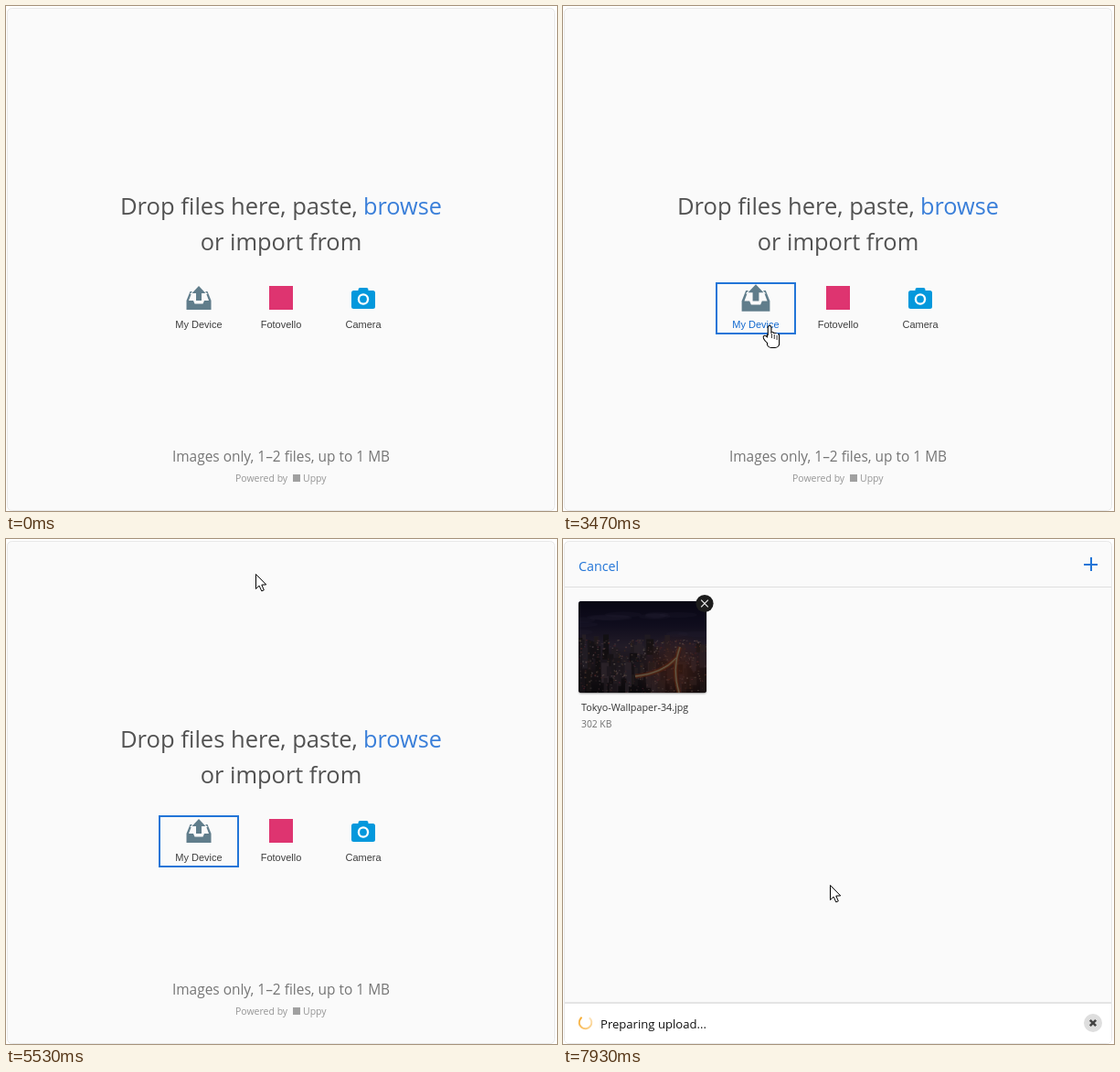
An HTML page with a canvas for the animation above (8000 ms loop, 603 by 552 pixels).

```html
<!DOCTYPE html>
<html lang="en">
<head>
<meta charset="utf-8">
<title>File uploader</title>
<style>
html, body { margin: 0; width: 100%; height: 100%; overflow: hidden; background: #fff; }
canvas { display: block; width: 603px; height: 552px; }
</style>
</head>
<body>
<canvas id="stage"></canvas>
<script>
const W = 603, H = 552, LOOP = 8000, FPS = 15;
const BLUE = '#2275d7', WIN = '#0078d7', BG = '#fafafa', RULE = '#dfdfdf';
const TITLE = '#525252', LABEL = '#3e3e3e';
const SANS = '"Open Sans", "Noto Sans", sans-serif';
const ARIAL = '"Liberation Sans", Arial, sans-serif';

// Moments, in steps of 1/15 s
const FOCUS = 33, OPEN = 52, THUMBS = 66, SELECT = 77, CLOSE = 78;
const LIST = 86, PREVIEW = 88, UPLOAD = 110;

const canvas = document.getElementById('stage');
const dpr = window.devicePixelRatio || 1;
canvas.width = W * dpr;
canvas.height = H * dpr;
const c = canvas.getContext('2d');

// Pointer moves: first step, last step, target x, target y
const moves = [
  [6, 9, 572, 483], [15, 28, 227, 349], [57, 64, 158, 296], [66, 73, 273, 38],
  [87, 91, 257, 100], [91, 93, 204, 276], [96, 104, 86, 515], [112, 119, 292, 378]
];

const ramp = (f, a, b) => Math.max(0, Math.min(1, (f - a) / (b - a)));
const easeOut = (k, power) => 1 - (1 - k) ** power;
const inside = (p, x, y, w, h) => p.x >= x && p.x < x + w && p.y >= y && p.y < y + h;

// Vertical travel settles sooner than horizontal, which bends the path
function pointerAt(f) {
  const p = { x: W, y: H };
  for (const [from, to, x, y] of moves) {
    const k = ramp(f, from, to);
    p.x += (x - p.x) * easeOut(k, 2);
    p.y += (y - p.y) * easeOut(k, 3);
  }
  return { x: Math.round(p.x), y: Math.round(p.y) };
}

function text(s, x, y, size, color, align = 'left', family = SANS) {
  c.font = `${size}px ${family}`;
  c.textAlign = align;
  c.fillStyle = color;
  c.fillText(s, x, y);
}

function rect(x, y, w, h, color) {
  c.fillStyle = color;
  c.fillRect(x, y, w, h);
}

function box(x, y, w, h, fill, border, lw = 1) {
  rect(x, y, w, h, border);
  rect(x + lw, y + lw, w - 2 * lw, h - 2 * lw, fill);
}

function round(x, y, w, h, r, color) {
  c.beginPath();
  c.roundRect(x, y, w, h, r);
  c.fillStyle = color;
  c.fill();
}

function disc(x, y, r, color, ry = r) {
  c.beginPath();
  c.ellipse(x, y, r, ry, 0, 0, Math.PI * 2);
  c.fillStyle = color;
  c.fill();
}

function trace(points) {
  c.beginPath();
  for (let i = 0; i < points.length; i += 2) c.lineTo(points[i], points[i + 1]);
}

function poly(color, points) {
  trace(points);
  c.closePath();
  c.fillStyle = color;
  c.fill();
}

function line(color, lw, ...points) {
  trace(points);
  c.strokeStyle = color;
  c.lineWidth = lw;
  c.stroke();
}

// Closes the right half of an outline with its left mirror image
function mirror(...half) {
  const all = [...half];
  for (let i = half.length - 2; i >= 0; i -= 2) all.push(-half[i], half[i + 1]);
  return all;
}

function cross(x, y, r, lw, color) {
  for (const s of [-1, 1]) line(color, lw, x - r, y - r * s, x + r, y + r * s);
}

function fade(x0, y0, x1, y1, ...colors) {
  const g = c.createLinearGradient(x0, y0, x1, y1);
  colors.forEach((color, i) => g.addColorStop(i / (colors.length - 1), color));
  return g;
}

function clipTo(x, y, w, h, r = 0) {
  c.save();
  c.beginPath();
  c.roundRect(x, y, w, h, r);
  c.clip();
}

function shadow(blur, dx, dy, color) {
  c.shadowBlur = blur * dpr;
  c.shadowOffsetX = dx * dpr;
  c.shadowOffsetY = dy * dpr;
  c.shadowColor = color;
}

function panel() {
  rect(0, 0, W, H, '#fff');
  round(1.5, 2.5, 599, 549, 5, BG);
  c.strokeStyle = '#e8e8e8';
  c.lineWidth = 1;
  c.stroke();
}

function trayIcon(scale) {
  const color = '#607d8b', arrow = mirror(0, -13, 7.5, -5, 3, -5, 3, 3);
  c.save();
  c.translate(211, 319);
  c.scale(scale, scale);
  poly(color, mirror(9.5, -7, 13.5, 3, 13.5, 13));
  poly(BG, mirror(8, -5, 11, 3, 6, 3, 4.5, 6.5));
  poly(color, arrow);
  c.strokeStyle = BG;
  c.lineWidth = 2;
  c.stroke();
  poly(color, arrow);
  c.restore();
}

function cameraIcon() {
  const color = '#0398dc';
  round(378, 311, 26, 20, 2.5, color);
  round(385.5, 308, 11, 6, 2, color);
  disc(391, 320.5, 6.2, '#fff');
  disc(391, 320.5, 3.9, color);
}

function startView(hover, focus) {
  text('Drop files here, paste,', 125, 228, 25.55, TITLE);
  text('browse', 477, 228, 25.3, '#3a7fd9', 'right');
  text('or import from', 301, 267, 25.4, TITLE, 'center');
  trayIcon(hover ? 1.14 : 1);
  rect(288, 306, 26, 26, '#de3470');
  cameraIcon();
  ['My Device', 'Fotovello', 'Camera'].forEach((name, i) =>
    text(name, 211 + 90 * i, 352, 11, hover && !i ? '#1269cf' : LABEL, 'center', ARIAL));
  if (focus) {
    c.strokeStyle = BLUE;
    c.lineWidth = 2;
    c.strokeRect(168, 303, 86, 55);
  }
  text('Images only, 1–2 files, up to 1 MB', 301, 498, 15.45, '#757575', 'center');
  text('Powered by', 251, 520, 10.5, '#959595');
  rect(314, 512, 8, 8, '#a0a0a0');
  text('Uppy', 325, 520, 10.5, '#959595');
}

// City at night on a 140 x 100 field: sky, rows of towers, lights, a lit road
function cityPhoto(x, y, w, h, r) {
  let seed = 34;
  const rnd = (a, b) => a + (b - a) * ((seed = seed * 16807 % 2147483647) / 2147483647);
  clipTo(x, y, w, h, r);
  c.translate(x, y);
  c.scale(w / 140, h / 100);
  rect(0, 0, 140, 100, fade(0, 0, 0, 100, '#151233', '#28214c', '#5b4a68', '#3b2d38', '#1d171f'));
  for (let i = 0; i < 12; i++) {
    disc(rnd(0, 140), rnd(14, 38), rnd(10, 26), 'rgba(95,85,135,.2)', 3);
  }
  for (let i = 0; i < 90; i++) {
    const top = 36 + i * 0.6 + rnd(-3, 5);
    const shade = rnd(16, 38);
    rect(rnd(-5, 138), top, rnd(3, 9), rnd(9, 24), `hsl(${rnd(280, 350)} 11% ${shade}%)`);
  }
  for (let i = 0; i < 420; i++) {
    const ly = 42 + 58 * rnd(0, 1) ** 1.4;
    rect(rnd(0, 140), ly, rnd(0.8, 2.2), rnd(0.6, 1.6),
      `hsl(${rnd(-20, 35)} 45% ${rnd(45, 92)}% / ${rnd(0.35, 0.9)})`);
  }
  const glow = c.createRadialGradient(107, 76, 2, 107, 76, 42);
  glow.addColorStop(0, 'rgba(225,90,50,.5)');
  glow.addColorStop(1, 'rgba(225,90,50,0)');
  rect(0, 36, 140, 64, glow);
  for (const [lw, color] of [[5, 'rgba(225,85,40,.55)'], [2.4, '#ee9a5c'], [1, '#ffe6c0']]) {
    c.beginPath();
    c.moveTo(110, 100);
    c.quadraticCurveTo(102, 74, 111, 50);
    c.moveTo(62, 82);
    c.quadraticCurveTo(92, 79, 107, 62);
    c.strokeStyle = color;
    c.lineWidth = lw;
    c.stroke();
  }
  c.restore();
}

function meadowPhoto(x, y, w, h) {
  clipTo(x, y, w, h);
  rect(x, y, w, h, fade(0, y, 0, y + h, '#10160f', '#1c3011', '#3f7a1c', '#4f9420'));
  for (const px of [x + 34, x + 56]) {
    disc(px, y + 31, 13, '#deb5a6', 16);
    disc(px, y + 24, 9, '#eed0c2');
    disc(px, y + 28, 4, '#d5928a', 3);
  }
  c.restore();
}

function imageIcon(x) {
  box(x, -45, 64, 88, '#f8f8f8', '#cfcfcf');
  clipTo(x + 9, -30, 46, 57);
  rect(x, -30, 64, 57, WIN);
  for (const [px, py] of [[22, 3], [40, 5]]) {
    line('#fff', 4.5, x + px - 18, py + 26, x + px, py, x + px + 18, py + 26);
  }
  c.restore();
}

function folder() {
  rect(-5, -5, 43, 42, '#ffe596');
  round(20, 5, 22, 30, 3, '#ffe596');
  poly(fade(0, 0, 20, 0, '#fbd874', '#f3c757'), [-5, -5, 20, -5, 17, 26, 5, 43, -5, 43]);
}

const chevron = (x, y) => line('#444', 1.2, x - 4, y - 2, x, y + 2, x + 4, y - 2);

function thumb(photo, x, y, w, h) {
  rect(x + 1, y + 2, w + 1, h, 'rgba(0,0,0,.22)');
  photo(x, y, w, h, 0);
}

function dialog(f, hover) {
  const shown = ramp(f, OPEN, OPEN + 3) - ramp(f, CLOSE, CLOSE + 4);
  if (shown <= 0) return;
  const scale = 0.94 + 0.06 * shown;
  c.save();
  c.globalAlpha = shown;
  c.translate(-60 * (1 - scale), 150 * (1 - scale));
  c.scale(scale, scale);

  c.save();
  shadow(20, 4, 2, 'rgba(0,0,0,.32)');
  rect(-100, -100, 437, 538, '#1883d7');
  c.restore();
  rect(-100, -100, 436, 461, '#fff');
  rect(-100, 361, 436, 76, '#f0f0f0');

  if (hover) rect(212, -60, 105, 142, f >= SELECT ? '#cce8ff' : '#e5f3ff');
  folder();
  if (f >= THUMBS) {
    thumb(meadowPhoto, 95, -16, 91, 61);
    thumb(cityPhoto, 218, -20, 91, 65);
  } else {
    imageIcon(109);
    imageIcon(232);
  }
  text('Saved Pictures', 57, 61, 11.5, '#000', 'right');
  text('image.jpg', 141.5, 61, 11.6, '#000', 'center');
  text('Tokyo-Wallpaper', 265, 61, 11.6, '#000', 'center');
  text('-34.jpg', 264.5, 76, 11.6, '#000', 'center');

  box(-50, 370, 169, 24, '#fff', WIN);
  chevron(110, 382.5);
  box(131, 370, 188, 23, '#e1e1e1', '#adadad');
  text('All files (*)', 135, 386, 11.5, '#000');
  chevron(310, 381.5);
  box(132, 400, 86, 24, '#e1e1e1', WIN, 2);
  text('Open', 174.5, 416, 11.5, '#000', 'center');
  box(232, 400, 86, 24, '#e1e1e1', '#adadad');
  text('Cancel', 275, 416, 11.5, '#000', 'center');
  for (let i = 0; i < 3; i++) {
    for (let j = 0; j <= i; j++) rect(331 - j * 3, 427 + i * 3, 2, 2, '#bfbfbf');
  }
  c.restore();
}

function spinner(x, y, turn) {
  const start = turn * Math.PI * 2 - 0.9;
  const g = c.createConicGradient(start, x, y);
  g.addColorStop(0, 'rgba(246,166,35,.3)');
  g.addColorStop(0.8, 'rgba(246,166,35,.95)');
  c.beginPath();
  c.arc(x, y, 6.8, start, start + 5);
  c.strokeStyle = g;
  c.lineWidth = 2;
  c.stroke();
}

function fileView(f, hover) {
  const busy = f >= UPLOAD;
  rect(2, 52, 598, 1, RULE);
  text('Cancel', 17, 35, 14.3, BLUE);
  rect(570, 27, 15, 2, BLUE);
  rect(577, 20, 2, 15, BLUE);

  c.save();
  shadow(2, 0, 1, 'rgba(0,0,0,.4)');
  round(17, 68, 140, 100, 3, '#999');
  c.restore();
  if (f >= PREVIEW) cityPhoto(17, 68, 140, 100, 3);
  if (busy) round(17, 68, 140, 100, 3, `rgba(0,0,0,${0.62 * ramp(f, UPLOAD - 1, UPLOAD + 2)})`);
  disc(155, 70.5, 9.6, busy ? '#1c1c1c' : '#333');
  cross(155, 70.5, 3.8, 1.2, '#eee');
  text('Tokyo-Wallpaper-34.jpg', 20, 188, 10.75, '#333');
  text('302 KB', 20, 206, 10.3, '#707070');

  if (busy) {
    round(2, 506, 598, 45, [0, 0, 4, 4], '#fff');
    rect(2, 506, 598, 2, '#e4e4e4');
    spinner(24.5, 528.5, (f + 1) / FPS);
    text('Preparing upload...', 41, 535, 13.1, '#111');
    disc(580, 529, 10, '#dedede');
    cross(580, 529, 3.2, 2.6, '#444');
  } else {
    rect(2, 486, 598, 1, RULE);
    round(17, 496, 122, 46, 4, hover ? '#189c38' : '#1db441');
    text('Upload 1 file', 78.5, 525, 13.5, '#fff', 'center');
  }
}

function arrowPointer() {
  c.translate(0.5, 0.5);
  poly('#fff', [0, 0, 0, 16, 3.6, 12.6, 6.3, 18.4, 8.8, 17.3, 6.3, 11.6, 11.2, 11.4]);
  c.strokeStyle = '#000';
  c.lineWidth = 1;
  c.stroke();
}

// Palm, thumb and four fingers, outlined together
function handPointer() {
  const hand = new Path2D();
  hand.roundRect(-3, 11, 12, 13, [0, 0, 4, 4]);
  hand.ellipse(-4, 15.5, 1.8, 4.5, -0.7, 0, Math.PI * 2);
  for (let i = 0; i < 4; i++) hand.roundRect(-2.2 + 2.9 * i, i ? 7 + i : 1, 2.6, 12, 1.3);
  c.lineWidth = 2.2;
  c.strokeStyle = '#000';
  c.stroke(hand);
  c.fillStyle = '#fff';
  c.fill(hand);
  rect(-2, 9, 10, 12, '#fff');
  for (let i = 1; i < 4; i++) rect(-2 + 2.9 * i, 8 + i, 0.8, 5, '#000');
}

function draw(f) {
  c.setTransform(dpr, 0, 0, dpr, 0, 0);
  const p = pointerAt(f);
  const onDevice = f < OPEN + 3 && inside(p, 167, 302, 88, 57);
  const onUpload = f >= LIST && f < UPLOAD && inside(p, 17, 496, 122, 46);
  panel();
  if (f < LIST) {
    startView(onDevice, f >= FOCUS);
    dialog(f, inside(p, 212, 0, 105, 82));
  } else {
    fileView(f, onUpload);
  }
  c.translate(p.x, p.y);
  if (onDevice || onUpload) handPointer();
  else arrowPointer();
}

let last = -1;
function tick() {
  const t = performance.now() % LOOP;
  const f = Math.floor(t * FPS / 1000 + 0.1) % (LOOP * FPS / 1000);
  if (f !== last) draw(last = f);
  requestAnimationFrame(tick);
}
tick();
</script>
</body>
</html>
```
